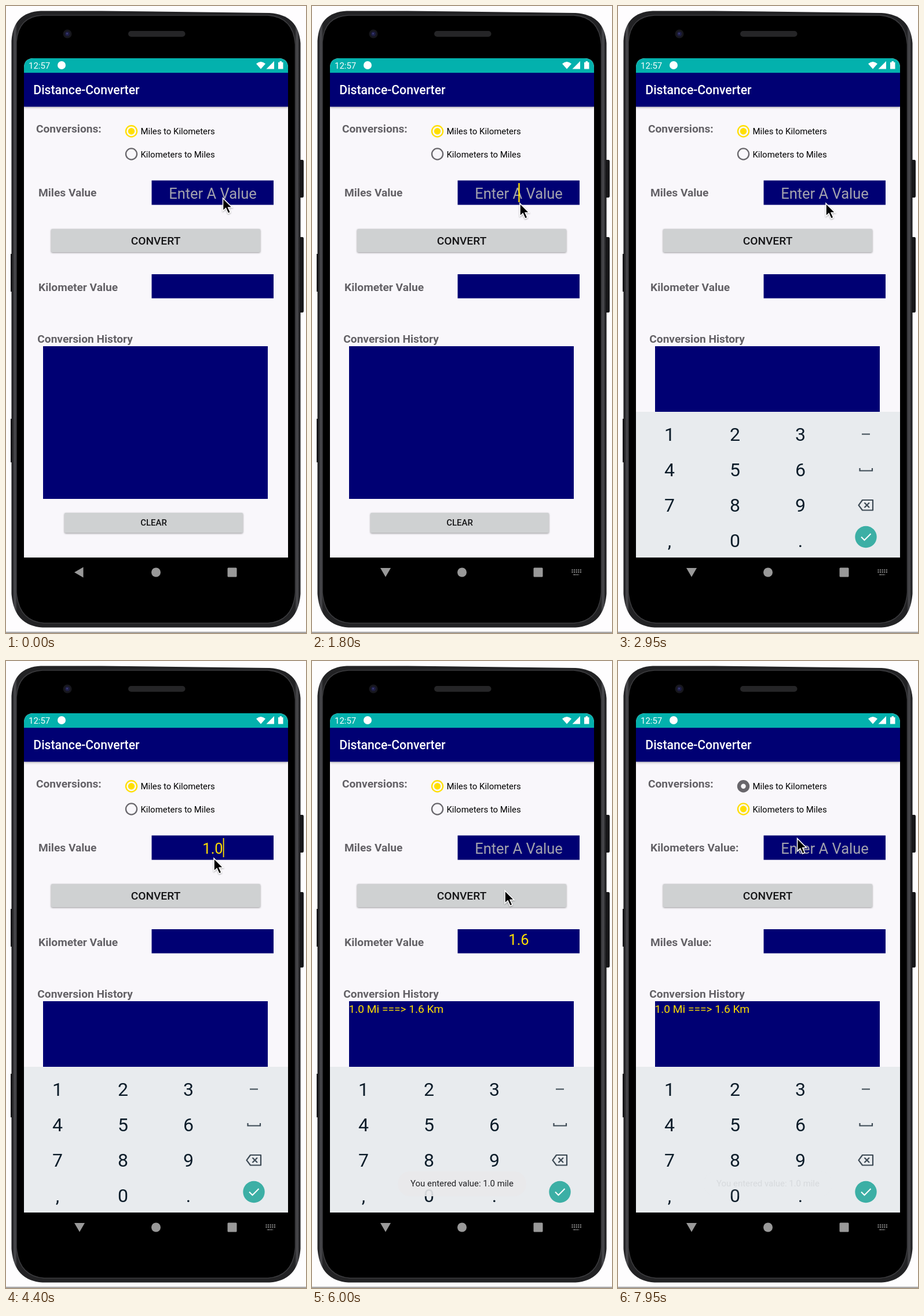
An HTML page for the animation above (8 s loop, 518 by 1080 pixels).

```html
<!DOCTYPE html>
<html lang="en">
<head>
<meta charset="utf-8">
<title>Distance-Converter</title>
<style>
  html, body { margin: 0; width: 100%; height: 100%; overflow: hidden; background: #fefdfe; }
  svg { display: block; width: 100vw; height: 100vh; font-family: Roboto, sans-serif; }
  .mid { text-anchor: middle; }
  .label { font-size: 19.15px; font-weight: 700; fill: #636166; }
  .small { font-size: 14.93px; }
  .big { font-size: 25.5px; text-anchor: middle; }
  .medium { font-weight: 500; fill: #141416; text-anchor: middle; }
  .yellow { fill: #ffdf00; }
  .button { fill: #cfd1d2; filter: drop-shadow(0 1.5px 1.5px #0006); }
  .key { font-size: 32px; text-anchor: middle; fill: #0c1c29; }
  .icon { fill: none; stroke: #3d4a55; stroke-width: 2.2; }
  .nav { fill: #999; }
</style>
</head>
<body>
<svg viewBox="0 0 518 1080" preserveAspectRatio="none">
  <defs>
    <clipPath id="screen"><path d="M31 950V107Q31 90 48 90H470Q487 90 487 107V950Z"/></clipPath>
    <linearGradient id="rim">
      <stop offset="0" stop-color="#111113"/><stop offset=".012" stop-color="#4c4c50"/>
      <stop offset=".02" stop-color="#222224"/><stop offset=".98" stop-color="#222224"/>
      <stop offset=".988" stop-color="#4c4c50"/><stop offset="1" stop-color="#111113"/>
    </linearGradient>
  </defs>

  <!-- phone -->
  <path stroke="#858587" stroke-width="1.5" d="M0 1078.7H518"/>
  <path fill="#171719" d="M508 265h4q2 0 2 3v59q0 3-2 3h-4zM508 398h4q2 0 2 3v124q0 3-2 3h-4zM11 427H8v65h3zM11 711H8v75h3z"/>
  <path fill="url(#rim)" d="M9.500 60Q12 11 60 8.500H165L455 12Q505 15 508.500 64V1012Q505 1067 455 1070.500H63Q13 1067 9.500 1012Z"/>
  <path fill="#000" stroke="#3b3b3e" stroke-width="1.5" d="M18 62Q21 18 63 16H452Q496 19 499.500 66V1010Q496 1060 452 1063H66Q22 1060 18 1010Z"/>
  <rect x="211" y="43" width="98.500" height="10" rx="5" fill="#252527"/>
  <circle cx="106" cy="48" r="7.500" fill="#17171d"/>
  <circle cx="106" cy="48" r="4" fill="#1d1d42"/>
  <circle cx="105.500" cy="47.500" r="1.500" fill="#3d3d78"/>

  <g clip-path="url(#screen)">
    <rect x="31" y="90" width="456" height="860" fill="#f9f7fb"/>
    <rect x="31" y="110" width="456" height="63.500" fill="#000073" style="filter:drop-shadow(0 1px 2px #0005)"/>
    <rect x="31" y="90" width="456" height="25" fill="#03b1ad"/>

    <!-- status bar -->
    <g fill="#fff">
      <text x="39" y="107.500" class="small">12:57</text>
      <circle cx="96" cy="102" r="7"/>
      <path d="M432 99.500Q440 92.500 448 99.500L440 108.500ZM463 95V108.500H449.500ZM470 97H472.500V95H476V97H478.500V108.500H470Z"/>
      <text x="47.300" y="152.300" font-size="21.200" font-weight="500">Distance-Converter</text>
    </g>

    <!-- form -->
    <text x="52" y="218" class="label">Conversions:</text>
    <g id="radios" fill="none"></g>
    <text x="232.500" y="221.200" class="small">Miles to Kilometers</text>
    <text x="232.500" y="260.500" class="small">Kilometers to Miles</text>
    <text x="56" y="328" class="label" id="fromLabel"></text>
    <text x="56" y="490.500" class="label" id="toLabel"></text>
    <text x="54.300" y="580" class="label">Conversion History</text>
    <path fill="#000073" d="M251.500 300.500h210.500v42h-210.500zM251.500 462h210.500v41.500h-210.500zM64 586h388v263h-388z"/>
    <text x="357" y="331.500" class="big" id="entry"></text>
    <rect y="305" height="33" class="yellow" id="caret"/>
    <text x="357" y="489" class="big yellow" id="result"></text>
    <text x="63.500" y="606" font-size="19.150" class="yellow" id="history">1.0 Mi ===&gt; 1.6 Km</text>
    <rect x="78" y="384" width="361" height="40" rx="2" class="button"/>
    <text x="258.500" y="411.300" class="medium" font-size="19.150">CONVERT</text>
    <rect x="101" y="873" width="308" height="34.500" rx="2" class="button"/>
    <text x="255" y="894.800" class="medium small">CLEAR</text>

    <!-- keypad -->
    <g id="keypad">
      <rect x="31" y="699" width="456" height="251" fill="#e8ebee"/>
      <g id="keys"></g>
      <path class="icon" d="M421 737.500H435M417.500 796V800.500H439V796"/>
      <path class="icon" stroke-linejoin="round" d="M422 851H440V868.500H422L415.500 859.800ZM425.500 855.500L434 864M434 855.500L425.500 864"/>
      <circle cx="428" cy="914.500" r="18.700" fill="#3cafa5"/>
      <path fill="none" stroke="#fff" stroke-width="2" d="M420 914.500L425.500 920L436.500 909"/>
    </g>

    <g id="toast">
      <rect x="148" y="879" width="222" height="43" rx="21" fill="#e9e9ec" opacity=".9"/>
      <text x="259" y="905" class="small mid" fill="#202124">You entered value: 1.0 mile</text>
    </g>
  </g>

  <!-- navigation bar -->
  <path id="back" class="nav" d="M-9 0L6.500 -9V9Z"/>
  <circle cx="259" cy="975.500" r="8" class="nav"/>
  <rect x="382.500" y="967.500" width="16" height="16" rx="1.500" class="nav"/>
  <path id="keyIcon" fill="none" stroke="#999" stroke-width="2" stroke-dasharray="2 1.600" d="M448.500 971.500H465.500M448.500 975H465.500M451 979.500h1M453 979.500h8"/>

  <path id="mouse" fill="#000" stroke="#fff" stroke-width="1.600" d="M0 0V22L5 17.300L9 26.300L13 24.500L9.200 16H16Z" style="filter:drop-shadow(0 1px 1px #0005)"/>
</svg>
<script>
const DURATION = 8000;
const FOCUS = 1400, CONVERT = 5450, SWITCH = 7750;
const TYPED = [[3300, "1"], [3750, "1."], [4150, "1.0"]];
// Pointer tip: time, x, y
const POINTER = [
  [700, 374.500, 331], [1250, 359, 340], [4750, 359, 340], [5300, 333, 395.500],
  [6250, 333, 395.500], [7000, 183, 255.500], [7200, 183, 255.500],
  [7550, 212, 251], [7730, 212, 251], [7960, 310, 306]
];

const $ = id => document.getElementById(id);
const ramp = (t, a, b) => Math.min(1, Math.max(0, (t - a) / (b - a)));
const ease = p => p * p * (3 - 2 * p);
const place = (el, x, y, turn = 0) =>
  el.setAttribute("transform", `translate(${x} ${y}) rotate(${turn})`);

$("keys").innerHTML = [..."123456789,0."].map((key, i) =>
  `<text class="key" x="${89 + 113 * (i % 3)}" y="${748.8 + 61.200 * Math.floor(i / 3)}">${key}</text>`).join("");

function pointerAt(t) {
  let i = POINTER.findIndex(p => p[0] > t);
  if (i < 0) i = POINTER.length;
  const a = POINTER[Math.max(0, i - 1)], b = POINTER[Math.min(i, POINTER.length - 1)];
  const p = a === b ? 0 : ease(ramp(t, a[0], b[0]));
  return [a[1] + (b[1] - a[1]) * p, a[2] + (b[2] - a[2]) * p];
}

function radio(y, on, hole, dot) {
  const color = on ? "#ffdf00" : "#68666b";
  const width = 10.700 - hole;
  return `<circle cx="216.500" cy="${y}" r="${hole + width / 2}" stroke="${color}" stroke-width="${width}"/>` +
    (on ? `<circle cx="216.500" cy="${y}" r="${dot}" fill="${color}"/>` : "");
}

function draw(t) {
  const switched = t >= SWITCH, converted = t >= CONVERT;

  $("radios").innerHTML = switched
    ? radio(215.800, false, 8.400 * ramp(t, SWITCH, SWITCH + 400), 0) + radio(255, true, 8.400, 5.700 * ramp(t, SWITCH, SWITCH + 150))
    : radio(215.800, true, 8.400, 5.700) + radio(255, false, 8.400, 0);
  $("fromLabel").textContent = switched ? "Kilometers Value:" : "Miles Value";
  $("toLabel").textContent = switched ? "Miles Value:" : "Kilometer Value";

  const last = TYPED.filter(k => k[0] <= t).pop();
  const value = last && !converted ? last[1] : "";
  const entry = $("entry");
  entry.textContent = value || "Enter A Value";
  entry.setAttribute("fill", value ? "#ffdf00" : "#a3a3ae");

  const blinkStart = converted ? CONVERT : last ? last[0] : FOCUS;
  const caret = $("caret");
  caret.setAttribute("x", value ? 357 + entry.getComputedTextLength() / 2 : 356.300);
  caret.setAttribute("width", value ? 1.800 : 2.400);
  caret.style.opacity = +(t >= blinkStart && (t - blinkStart) % 1000 < 500);

  $("result").textContent = converted && !switched ? "1.6" : "";
  $("history").style.opacity = +converted;
  $("toast").style.opacity = ramp(t, 5500, 5800) * (1 - ramp(t, 7550, 7985));

  const rise = 1 - (1 - ramp(t, 1850, 2150)) ** 2;
  place($("keypad"), 0, 253 * (1 - rise));
  const turn = ease(ramp(t, 1480, 1720));
  place($("back"), 127, 975.500 - turn, -90 * turn);
  $("keyIcon").style.opacity = turn;

  place($("mouse"), ...pointerAt(t));
}

function tick(now) {
  draw(now % DURATION);
  requestAnimationFrame(tick);
}
requestAnimationFrame(tick);
</script>
</body>
</html>
```
